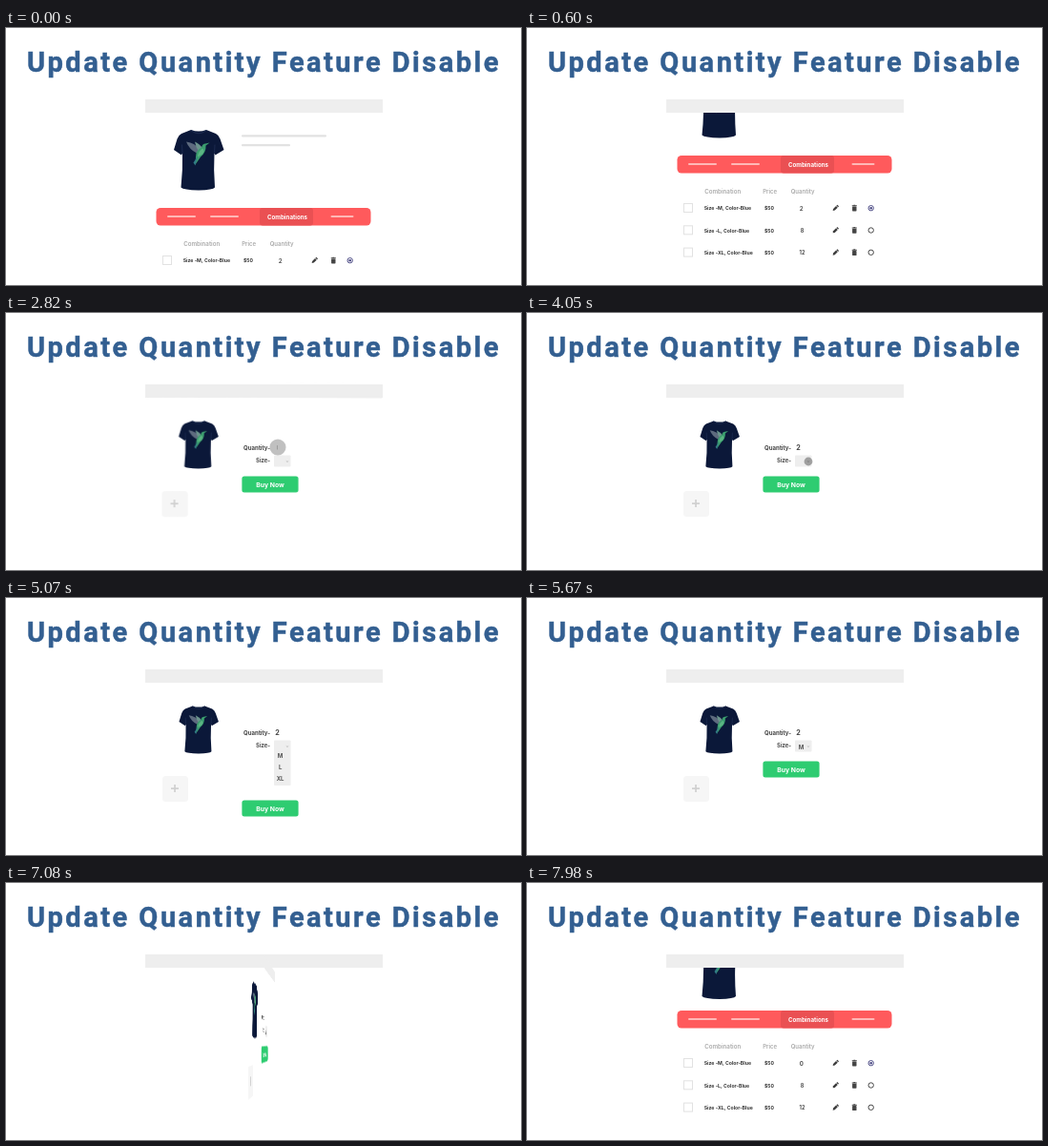
An HTML page with a canvas for the animation above (8 s loop, 540x270 px).

```html
<!DOCTYPE html>
<html lang="en">
<head>
<meta charset="utf-8">
<title>Update Quantity</title>
<style>
html, body { margin: 0; width: 100%; height: 100%; overflow: hidden; background: #fff; }
#stage { position: relative; width: 540px; height: 270px; overflow: hidden; background: #fff; }
h1 {
  position: absolute; left: 22px; top: 19px; margin: 0; white-space: nowrap;
  font: bold 29px/34px Roboto, sans-serif; letter-spacing: 2.48px; color: #335f91;
  -webkit-text-stroke: 0.5px #335f91;
}
#bar { position: absolute; left: 146px; top: 75px; width: 249px; height: 14px; background: #eee; }
#view { position: absolute; left: 146px; top: 75px; width: 249px; height: 183px; overflow: hidden; perspective: 465px; }
canvas { display: block; }
</style>
</head>
<body>
<div id="stage">
  <h1>Update Quantity Feature Disable</h1>
  <div id="bar"></div>
  <div id="view"><canvas id="card" width="249" height="183"></canvas></div>
</div>
<script>
const LOOP = 8000;
const card = document.getElementById('card');
const g = card.getContext('2d');

const clamp = u => Math.max(0, Math.min(1, u));
const ramp = (t, a, b) => clamp((t - a) / (b - a));
const quad = u => u < 0.5 ? 2 * u * u : 1 - 2 * (1 - u) * (1 - u);
const ease = (t, a, b) => quad(ramp(t, a, b));

function box(x, y, w, h, r, color) {
  g.fillStyle = color;
  g.beginPath();
  g.roundRect(x, y, w, h, r);
  g.fill();
}

function text(str, x, y, size, color, align = 'left', weight = 600) {
  g.font = `${weight} ${size}px Inter, sans-serif`;
  g.textAlign = align;
  g.fillStyle = color;
  g.fillText(str, x, y + size * 0.36);
}

function disc(x, y, r, color) {
  g.fillStyle = color;
  g.beginPath();
  g.arc(x, y, r, 0, 7);
  g.fill();
}

function path(d, color) {
  g.fillStyle = color;
  g.fill(new Path2D(d));
}

function ripple(x, y, u, size = 23) {
  if (u <= 0 || u >= 1) return;
  disc(x, y, size * u ** 1.15, `rgba(0,0,0,${0.43 * (1 - u)})`);
}

function shirt(x, y, s) {
  g.save();
  g.translate(x, y);
  g.scale(s, s);
  path('M-8 0.500Q0 3.500 8 0.500L18 4.500Q21 6 22.500 10L26.500 21.500L17.500 27L16.500 25Q15.500 42 17 61Q15 63.500 0 64Q-16 63.500 -18.500 61Q-16.500 42 -17 25L-18 27L-26 21.500L-22.500 10Q-21 6 -18 4.500Z', '#0b1839');
  g.strokeStyle = '#1d2c52';
  g.lineWidth = 0.9;
  g.stroke(new Path2D('M-8 1Q0 7.500 8 1M-17 25L-17.500 16M16.500 25L17 16'));
  path('M-13 13Q-4 14 1 21L-2 25Q-10 21 -13 13Z', '#5d6a7e');
  path('M-4 13Q2 16 4 20L0 23Q-3 19 -4 13Z', '#6b938c');
  path('M11.500 14L7.500 17Q8 24 2 29L-3.500 37L-3 29Q-3 22 3 19Q4 15 7 15Z', '#3b9d6e');
  path('M4 20Q7 22 4 26L-1 29Q-1 24 4 20Z', '#5bb583');
  path('M-1 28L-3.500 38L-5.500 35Z', '#327c86');
  g.restore();
}

function pencil(x, y) {
  g.save();
  g.translate(x, y);
  g.rotate(-Math.PI / 4);
  path('M-4 0L-2.200 -1.200H2V1.200H-2.200Z', '#3c3c3c');
  path('M2.500 -1.200H3.800V1.200H2.500Z', '#3c3c3c');
  g.restore();
}

function trash(x, y) {
  box(x - 2.6, y - 3, 5.2, 1, 0.3, '#444');
  box(x - 1, y - 3.5, 2, 1, 0.3, '#444');
  box(x - 2.2, y - 1.7, 4.4, 4.9, 0.6, '#444');
}

function radio(x, y, on) {
  g.strokeStyle = on ? '#4d4c86' : '#444';
  g.lineWidth = 1;
  g.beginPath();
  g.arc(x, y, 2.7, 0, 7);
  g.stroke();
  if (on) disc(x, y, 1.3, '#4d4c86');
}

function row(i, size, qty) {
  const y = 244.4 + i * 23.3;
  g.strokeStyle = '#e2e2e2';
  g.lineWidth = 1;
  g.strokeRect(164.5, y - 4.9, 9, 9);
  text(`Size -${size}, Color-Blue`, 185.7, y, 5.2, '#333', 'left', 700);
  text('$50', 254, y + 0.2, 5.2, '#333', 'center', 700);
  if (qty) text(qty, 288.5, y + 0.3, 5.5, '#444', 'center', 700);
  pencil(323.5, y - 0.2);
  trash(343.3, y - 0.2);
  radio(360.7, y - 0.2, i === 0);
}

function listPage(t) {
  const late = t > 6000;
  const scroll = 55 * (late ? ease(t, 7110, 7680) : ease(t, 15, 600));
  const drop = late ? 6.5 * ease(t, 7710, 7980) : 0;
  g.save();
  g.translate(0, -scroll);
  shirt(202, 106.5 + drop, 1);
  box(247, 112.2, 89, 2.2, 1, '#e2e2e2');
  box(247, 122, 51, 2.2, 1, '#e2e2e2');

  box(157.5, 189, 225, 18.6, 4.5, '#ff5a5c');
  box(266, 189, 56, 18.6, 3, '#ea5053');
  for (const [x, w] of [[169, 30], [214, 30], [340.5, 24]]) box(x, 197, w, 2, 1, '#ffb8b6');
  text('Combinations', 295, 198.6, 6.2, '#fff', 'center', 700);

  text('Combination', 186.2, 226.8, 6.2, '#aaa');
  text('Price', 247.2, 226.8, 6, '#aaa');
  text('Quantity', 276.7, 226.8, 6, '#aaa');

  row(0, 'M', '');
  const sold = late ? ramp(t, 7710, 7950) : 0;
  g.globalAlpha = 1 - sold;
  text('2', 287.7, 245, 6.2, '#444', 'center');
  g.globalAlpha = sold;
  text('0', 287.7, 245, 6.2, '#444', 'center');
  g.globalAlpha = 1;
  row(1, 'L', '8');
  row(2, 'XL', '12');
  g.restore();
}

function shopPage(t) {
  const open = ease(t, 4050, 4470) - ease(t, 5220, 5670);
  const grow = 35.5 * open;
  const shift = 41 * open;

  shirt(202, 113, 0.79);
  box(164, 187, 27, 27, 3.5, '#f6f6f6');
  box(173, 199.3, 8, 1.7, 0, '#d0d0d0');
  box(176.2, 196, 1.7, 8, 0, '#d0d0d0');

  text('Quantity-', 277, 141.4, 6, '#444', 'right', 700);
  text('Size-', 277, 155.2, 5.9, '#444', 'right', 700);
  if (t >= 3270) text('2', 284.5, 141.4, 7.2, '#444', 'center', 700);
  else box(284.2, 139, 0.7, 4.5, 0, '#bbb');

  box(281, 149.5, 17.5, 12 + grow, 0.8, '#eee');
  g.save();
  g.beginPath();
  g.rect(281, 149.5, 17.5, 12 + grow);
  g.clip();
  if (open > 0) {
    ['M', 'L', 'XL'].forEach((s, i) => {
      g.globalAlpha = clamp(open * 2 - 0.5);
      text(s, 287.6, 166 + i * 11.7, 6, '#555', 'center', 700);
    });
    g.globalAlpha = 1;
  }
  g.globalAlpha = ramp(t, 5300, 5600);
  text('M', 287.6, 156.4, 6, '#555', 'center', 700);
  g.restore();
  g.strokeStyle = '#aaa';
  g.lineWidth = 0.7;
  g.stroke(new Path2D('M293.800 155.400L295 156.500L296.200 155.400'));

  const button = [247.4, 171.4 + shift, 59.2, 17, 2.5];
  box(...button, '#2ecc71');
  text('Buy Now', 277, 180.2 + shift, 6.8, '#fff', 'center', 700);
  g.save();
  g.beginPath();
  g.roundRect(...button);
  g.clip();
  ripple(277, 180, ramp(t, 5990, 6570), 32);
  g.restore();

  ripple(285, 141, ramp(t, 2580, 3150));
  ripple(295, 156, ramp(t, 3920, 4470));
  ripple(288, 166, ramp(t, 5070, 5670));
}

const flip = (t, start) => t < start ? 0 : ease(t, start - 40, start + 420);

function draw(t) {
  const p = flip(t, 2430) - flip(t, 6900);
  const back = p > 0.5;
  const angle = 180 * (back ? 1 - p : -p);
  card.style.transform = angle ? `rotateY(${angle}deg)` : 'none';

  g.setTransform(1, 0, 0, 1, 0, 0);
  g.clearRect(0, 0, 249, 183);
  g.translate(-146, -75);
  box(146, 75, 249, 14, 0, '#eee');
  g.save();
  g.beginPath();
  g.rect(146, 89, 249, 169);
  g.clip();
  (back ? shopPage : listPage)(t);
  g.restore();
}

const begin = performance.now();
function tick() {
  draw((performance.now() - begin) % LOOP);
  requestAnimationFrame(tick);
}
tick();
</script>
</body>
</html>
```
